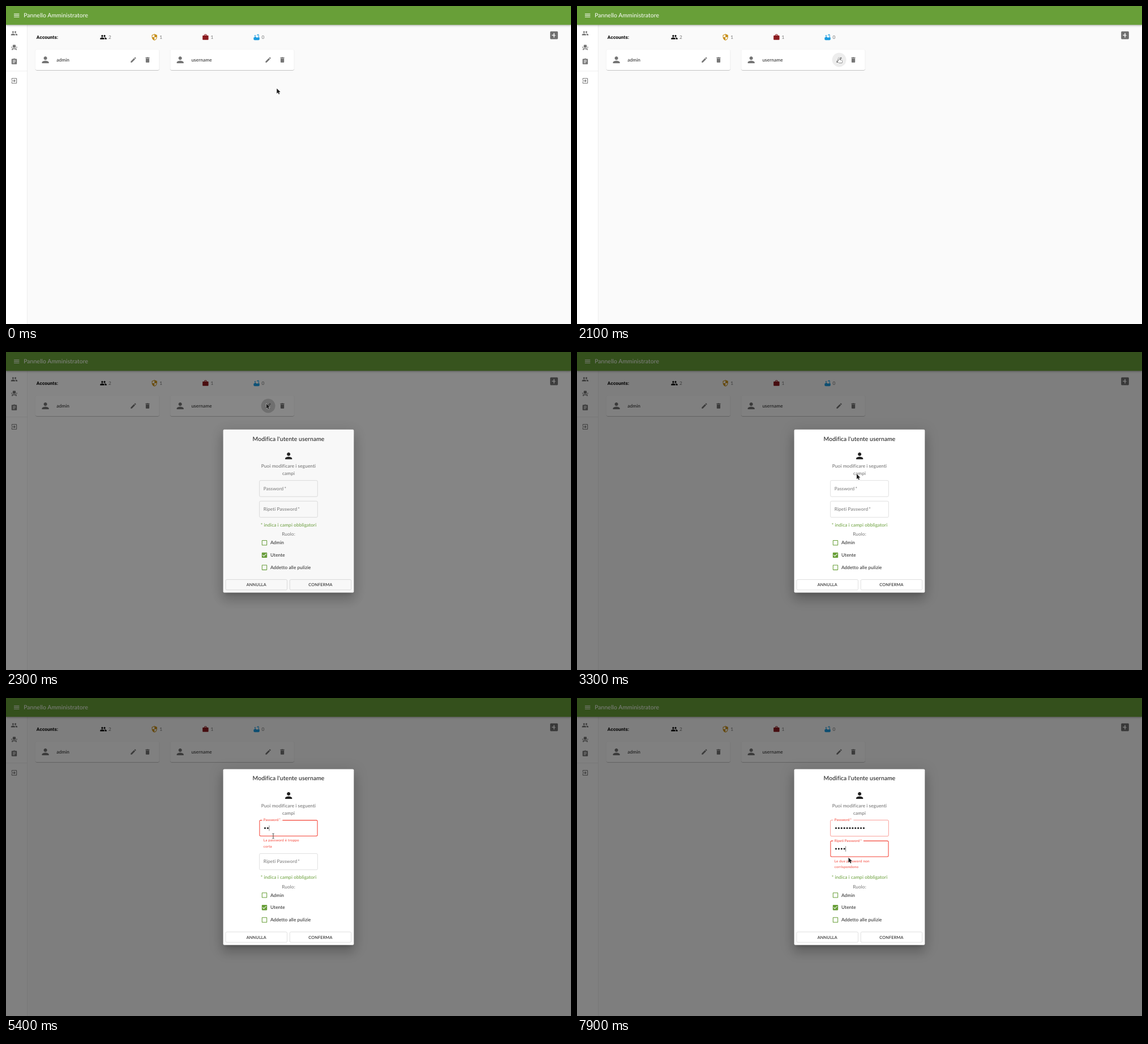
An HTML page with a canvas for the animation above (8 s loop, 998 by 561 pixels).

```html
<!DOCTYPE html>
<html lang="it">
<head>
<meta charset="utf-8">
<title>Pannello Amministratore</title>
<style>
html, body { margin: 0; width: 100%; height: 100%; overflow: hidden; background: #fafafa }
canvas { display: block }
</style>
</head>
<body>
<canvas id="stage" width="998" height="561"></canvas>
<script>
const W = 998, H = 561, LOOP = 8000, STEP = 100;
const GREEN = '#689f38', RED = '#f44336', INK = '#212121', GREY = '#757575';
const BODY = 8.32, GROW = 22.6;

const ICONS = {
  menu: 'M3 18h18v-2H3v2zm0-5h18v-2H3v2zm0-7v2h18V6H3z',
  people: 'M16 11c1.66 0 2.99-1.34 2.99-3S17.66 5 16 5c-1.66 0-3 1.34-3 3s1.34 3 3 3zm-8 0c1.66 0 2.99-1.34 2.99-3S9.66 5 8 5C6.34 5 5 6.34 5 8s1.34 3 3 3zm0 2c-2.33 0-7 1.17-7 3.5V19h14v-2.5c0-2.33-4.67-3.5-7-3.5zm8 0c-.29 0-.62.02-.97.05 1.16.84 1.97 1.97 1.97 3.45V19h6v-2.5c0-2.33-4.67-3.5-7-3.5z',
  seat: 'M4 18v3h3v-3h10v3h3v-6H4zm15-8h3v3h-3zM2 10h3v3H2zm15 3H7V5c0-1.1.9-2 2-2h6c1.1 0 2 .9 2 2v8z',
  tasks: 'M19 3h-4.18C14.4 1.84 13.3 1 12 1c-1.3 0-2.4.84-2.82 2H5c-1.1 0-2 .9-2 2v14c0 1.1.9 2 2 2h14c1.1 0 2-.9 2-2V5c0-1.1-.9-2-2-2zm-7 0c.55 0 1 .45 1 1s-.45 1-1 1-1-.45-1-1 .45-1 1-1zm2 14H7v-2h7v2zm3-4H7v-2h10v2zm0-4H7V7h10v2z',
  exit: 'M10.09 15.59L11.5 17l5-5-5-5-1.41 1.41L12.67 11H3v2h9.67l-2.58 2.59zM19 3H5c-1.11 0-2 .9-2 2v4h2V5h14v14H5v-4H3v4c0 1.1.89 2 2 2h14c1.1 0 2-.9 2-2V5c0-1.1-.9-2-2-2z',
  shield: 'M12 1L3 5v6c0 5.55 3.84 10.74 9 12 5.16-1.26 9-6.45 9-12V5l-9-4zm0 10.99h7c-.53 4.12-3.28 7.79-7 8.94V12H5V6.3l7-3.11v8.8z',
  work: 'M20 6h-4V4c0-1.11-.89-2-2-2h-4c-1.11 0-2 .89-2 2v2H4c-1.11 0-1.99.89-1.99 2L2 19c0 1.11.89 2 2 2h16c1.11 0 2-.89 2-2V8c0-1.11-.89-2-2-2zm-6 0h-4V4h4v2z',
  bath: 'M5 7a2 2 0 1 0 4 0a2 2 0 1 0-4 0zM20 13V4.83C20 3.27 18.73 2 17.17 2c-.75 0-1.47.3-2 .83l-1.25 1.25c-.16-.05-.33-.08-.51-.08-.4 0-.77.12-1.08.32l2.76 2.76c.2-.31.32-.68.32-1.08 0-.18-.03-.34-.07-.51l1.25-1.25c.15-.15.36-.24.58-.24.46 0 .83.37.83.83V13h-6.85c-.3-.21-.57-.45-.82-.72l-1.4-1.55c-.19-.21-.43-.38-.69-.5-.31-.15-.65-.23-1-.23C6 10.01 5 11.01 5 12.25V13H2v6c0 1.1.9 2 2 2 0 .55.45 1 1 1h14c.55 0 1-.45 1-1 1.1 0 2-.9 2-2v-6h-2z',
  person: 'M12 12c2.21 0 4-1.79 4-4s-1.79-4-4-4-4 1.79-4 4 1.79 4 4 4zm0 2c-2.67 0-8 1.34-8 4v2h16v-2c0-2.66-5.33-4-8-4z',
  edit: 'M3 17.25V21h3.75L17.81 9.94l-3.75-3.75L3 17.25zM20.71 7.04c.39-.39.39-1.02 0-1.41l-2.34-2.34c-.39-.39-1.02-.39-1.41 0l-1.83 1.83 3.75 3.75 1.83-1.83z',
  trash: 'M6 19c0 1.1.9 2 2 2h8c1.1 0 2-.9 2-2V7H6v12zM19 4h-3.5l-1-1h-5l-1 1H5v2h14V4z',
  add: 'M19 3H5c-1.11 0-2 .9-2 2v14c0 1.1.89 2 2 2h14c1.1 0 2-.9 2-2V5c0-1.1-.9-2-2-2zm-2 10h-4v4h-2v-4H7v-2h4V7h2v4z',
  box: 'M19 5v14H5V5h14m0-2H5c-1.1 0-2 .9-2 2v14c0 1.1.9 2 2 2h14c1.1 0 2-.9 2-2V5c0-1.1-.9-2-2-2z',
  checked: 'M19 3H5c-1.11 0-2 .9-2 2v14c0 1.1.89 2 2 2h14c1.11 0 2-.9 2-2V5c0-1.1-.89-2-2-2zm-9 14l-5-5 1.41-1.41L10 14.17l7.59-7.59L19 8l-9 9z'
};
const CURSORS = {
  arrow: 'M0 0V9L2.1 7.1 3.5 10.2 5 9.5 3.7 6.5 6.4 6.3z',
  hand: 'M0 1a.9.9 0 0 1 1.8 0V4l4 .8q1 .3.8 1.5L6 9.3H1L-2.4 6q0-1.2 1.2-.9L0 6z',
  beam: 'M-1.6-4.4Q0-4.4 0-3.5V3.5Q0 4.4-1.6 4.4M1.6-4.4Q0-4.4 0-3.5M0 3.5Q0 4.4 1.6 4.4'
};
for (const set of [ICONS, CURSORS])
  for (const name in set) set[name] = new Path2D(set[name]);

// Pointer waypoints: time, x, y
const POINTER = [
  [700, 478.3, 145.5], [1600, 459.8, 91], [2500, 459.8, 91], [2600, 495, 210],
  [2700, 522, 296], [2800, 516, 187], [3000, 516, 187], [3600, 472, 243.5],
  [6300, 472, 243.5], [6400, 472.5, 245], [7000, 479.5, 281.5]
];

const screen = document.getElementById('stage').getContext('2d');
const sheet = Object.assign(document.createElement('canvas'), { width: W, height: H }).getContext('2d');
let ctx = screen;

const clamp = v => Math.min(1, Math.max(0, v));
const lerp = (a, b, k) => a + (b - a) * k;
const smooth = k => k * k * (3 - 2 * k);

// cubic-bezier(.4, 0, .2, 1)
function standardEase(x) {
  let lo = 0, hi = 1, s = .5;
  for (let i = 0; i < 20; i++) {
    s = (lo + hi) / 2;
    const bx = 1.2 * (1 - s) ** 2 * s + .6 * (1 - s) * s * s + s ** 3;
    if (bx < x) lo = s; else hi = s;
  }
  return 3 * (1 - s) * s * s + s ** 3;
}

function text(str, x, y, { size = BODY, color = INK, weight = 400, align = 'left', spacing = .0094, family = 'Lato' } = {}) {
  ctx.font = `${weight} ${size}px ${family}, sans-serif`;
  ctx.letterSpacing = spacing * size + 'px';
  ctx.textRendering = 'geometricPrecision';
  ctx.textAlign = align;
  ctx.fillStyle = color;
  ctx.fillText(str, x, y);
  return ctx.measureText(str).width;
}

function icon(name, cx, cy, color = GREY, size = 12.5) {
  ctx.save();
  ctx.translate(cx - size / 2, cy - size / 2);
  ctx.scale(size / 24, size / 24);
  ctx.fillStyle = color;
  ctx.fill(ICONS[name]);
  ctx.restore();
}

function roundRect(x, y, w, h, r) {
  ctx.beginPath();
  ctx.roundRect(x, y, w, h, r);
}

// Each shadow: offset y, blur, spread, alpha
function paper(x, y, w, h, r, color, shadows) {
  for (const [dy, blur, spread, alpha] of shadows) {
    ctx.save();
    ctx.shadowColor = `rgba(0,0,0,${alpha})`;
    ctx.shadowBlur = blur * .52;
    ctx.shadowOffsetX = 2000;
    ctx.shadowOffsetY = dy * .52;
    const s = spread * .52;
    ctx.fillStyle = '#000';
    roundRect(x - s - 2000, y - s, w + 2 * s, h + 2 * s, r);
    ctx.fill();
    ctx.restore();
  }
  ctx.fillStyle = color;
  roundRect(x, y, w, h, r);
  ctx.fill();
}

function outline(x, y, w, h, color, width) {
  ctx.strokeStyle = color;
  ctx.lineWidth = width;
  roundRect(x + width / 2, y + width / 2, w - width, h - width, 2);
  ctx.stroke();
}

function card(x, name, glow) {
  paper(x, 77, 218.8, 36, 2, '#fff', [[2, 1, -1, .2], [1, 1, 0, .14], [1, 3, 0, .12]]);
  icon('person', x + 17.6, 95, GREY, 18.2);
  text(name, x + 37.3, 97.6);
  if (glow) {
    ctx.fillStyle = `rgba(0,0,0,${glow})`;
    ctx.beginPath();
    ctx.arc(x + 173, 95, 12.5, 0, 7);
    ctx.fill();
  }
  icon('edit', x + 173, 95);
  icon('trash', x + 198, 95);
}

function page(t) {
  ctx.fillStyle = '#fafafa';
  ctx.fillRect(0, 0, W, H);
  ctx.fillStyle = '#fff';
  ctx.fillRect(0, 0, 37.4, H);
  ctx.fillStyle = '#e0e0e0';
  ctx.fillRect(37.4, 0, .55, H);
  ctx.fillRect(0, 114.6, 37.4, .55);
  paper(0, 0, W, 33.3, 0, GREEN, [[2, 4, -1, .2], [4, 5, 0, .14], [1, 10, 0, .12]]);
  icon('menu', 18.7, 16.6, '#fff');
  text('Pannello Amministratore', 31.2, 20, { size: 10.4, color: '#fff', spacing: .0075 });
  ['people', 'seat', 'tasks'].forEach((name, i) => icon(name, 14.5, 48.2 + 24.9 * i));
  icon('exit', 14.5, 132);

  text('Accounts:', 53.8, 58.2, { weight: 700, family: 'Roboto', color: '#000' });
  [['people', '#000', 2], ['shield', '#c8901a', 1], ['work', '#8b1a1f', 1], ['bath', '#1a9be0', 0]]
    .forEach(([name, color, count], i) => {
      icon(name, 172 + 90.2 * i, 55, color);
      text(count, 181 + 90.2 * i, 57.9, { color: GREY });
    });
  icon('add', 968, 51.6, '#707070', 18.2);

  card(52, 'admin');
  card(290.1, 'username', t < 2000 || t >= 2400 ? 0 : t < 2200 ? .07 : t < 2300 ? .24 : .18);
}

function field(y, label, { focus, error, hover, float, dots, help }) {
  const accent = error ? RED : focus ? GREEN : null;
  outline(447.4, y, 103.2, 29, accent || (hover ? INK : '#c4c4c4'), focus ? 1.04 : .52);
  const size = lerp(BODY, 6.24, float);
  if (float) {
    ctx.font = '400 6.24px Lato, sans-serif';
    ctx.fillStyle = '#fff';
    ctx.fillRect(452.4, y - .5, ctx.measureText(label).width + 5.6, 2);
  }
  text(label, 454.8, y + lerp(17.2, 2.2, float), { size, color: accent || GREY });
  ctx.fillStyle = INK;
  for (let i = 0; i < dots; i++) {
    ctx.beginPath();
    ctx.arc(457.5 + 4.9 * i, y + 14.4, 1.55, 0, 7);
    ctx.fill();
  }
  if (focus) ctx.fillRect(454.9 + 4.9 * dots, y + 9.8, .55, 9.6);
  if (error) help.forEach((line, i) =>
    text(line, 454.8, y + 38.2 + 10.2 * i, { size: 6.24, color: RED, spacing: .0333 }));
}

function dialog(s) {
  const grow = s.short || s.mismatch ? GROW : 0;
  ctx.clearRect(0, 0, W, H);
  ctx.save();
  ctx.translate(0, -grow / 2);
  paper(383.6, 136.8, 230.8, 287.7 + grow, 2, '#fff', [[11, 15, -7, .2], [24, 38, 3, .14], [9, 46, 8, .12]]);
  const middle = { align: 'center', color: GREY };
  text("Modifica l'utente username", 499, 156.5, { ...middle, size: 10.4, weight: 500, color: INK, spacing: .0075 });
  icon('person', 499.2, 183.3, INK, 18.2);
  text('Puoi modificare i seguenti', 499, 204.4, { ...middle, weight: 500 });
  text('campi', 499, 216.9, { ...middle, weight: 500 });
  field(226.4, 'Password\u2009*', {
    focus: s.focus === 1, error: s.short || s.mismatch, hover: s.hover === 1,
    float: s.float1, dots: s.dots1, help: s.short ? ['La password è troppo', 'corta'] : []
  });
  if (s.short) ctx.translate(0, grow);
  field(262.9, 'Ripeti Password\u2009*', {
    focus: s.focus === 2, error: s.mismatch, hover: s.hover === 2,
    float: s.float2, dots: s.dots2, help: ['Le due password non', 'corrispondono']
  });
  if (s.mismatch) ctx.translate(0, grow);
  text('* indica i campi obbligatori', 499, 307.6, { ...middle, weight: 500, color: '#74a648' });
  text('Ruolo:', 499, 324.2, middle);
  ['Admin', 'Utente', 'Addetto alle pulizie'].forEach((role, i) => {
    const y = 336.6 + 21.8 * i;
    icon(i === 1 ? 'checked' : 'box', 456.5, y, GREEN);
    text(role, 467, y + 2.7);
  });
  ['ANNULLA', 'CONFERMA'].forEach((label, i) => {
    const x = 387.8 + 113.2 * i;
    outline(x, 401.2, 109, 18.8, '#c4c4c4', .52);
    text(label, x + 54.5, 413.2, { ...middle, size: 7.28, weight: 500, color: INK, spacing: .0286 });
  });
  ctx.restore();
}

function pointerAt(t) {
  const next = POINTER.findIndex(p => p[0] > t);
  if (next === 0) return POINTER[0].slice(1);
  if (next < 0) return POINTER.at(-1).slice(1);
  const [t0, x0, y0] = POINTER[next - 1], [t1, x1, y1] = POINTER[next];
  const k = smooth((t - t0) / (t1 - t0));
  return [lerp(x0, x1, k), lerp(y0, y1, k)];
}

function cursor(kind, x, y) {
  ctx.save();
  ctx.translate(x, y);
  ctx.lineJoin = 'round';
  ctx.lineWidth = .8;
  ctx.strokeStyle = kind === 'arrow' ? '#fff' : '#222';
  ctx.fillStyle = kind === 'arrow' ? '#1c1c1c' : '#fff';
  ctx.stroke(CURSORS[kind]);
  if (kind !== 'beam') ctx.fill(CURSORS[kind]);
  ctx.restore();
}

function stateAt(t) {
  const dots1 = t < 5400 ? 0 : t < 5900 ? 2 * Math.floor((t - 5200) / 200 * 2) / 2 - (t - 5400) / STEP % 1 : t < 6000 ? 10 : 11;
  return {
    dots1: t >= 5400 && t < 5900 ? 2 + 2 * (t - 5400) / STEP : dots1,
    dots2: t < 7500 ? 0 : Math.min(4, 1 + Math.floor((t - 7500) / STEP)),
    short: t >= 5400 && t < 5700,
    mismatch: t >= 7500,
    float1: clamp((t - 3600) / 200),
    float2: clamp((t - 7000) / 200),
    focus: t < 3700 ? 0 : t < 7100 ? 1 : 2
  };
}

function draw(t) {
  const [x, y] = pointerAt(t);
  const open = standardEase(clamp((t - 2140) / 225));
  const s = stateAt(t);
  const shift = s.short || s.mismatch ? -GROW / 2 : 0;
  const inside = top => open && x > 447 && x < 551 && y > top && y < top + 29;
  s.hover = inside(226.4 + shift) ? 1 : inside(262.9 + shift + (s.short ? GROW : 0)) ? 2 : 0;

  page(t);
  if (open) {
    ctx.fillStyle = `rgba(0,0,0,${open / 2})`;
    ctx.fillRect(0, 0, W, H);
    ctx = sheet;
    dialog(s);
    ctx = screen;
    ctx.globalAlpha = open;
    ctx.drawImage(sheet.canvas, 0, 0);
    ctx.globalAlpha = 1;
  }
  if (t >= 1800 && t < 2200) cursor('hand', 462, 91);
  else cursor(s.hover ? 'beam' : 'arrow', x, y);
}

function tick() {
  draw(Math.floor(performance.now() % LOOP / STEP) * STEP);
  requestAnimationFrame(tick);
}
tick();
</script>
</body>
</html>
```
